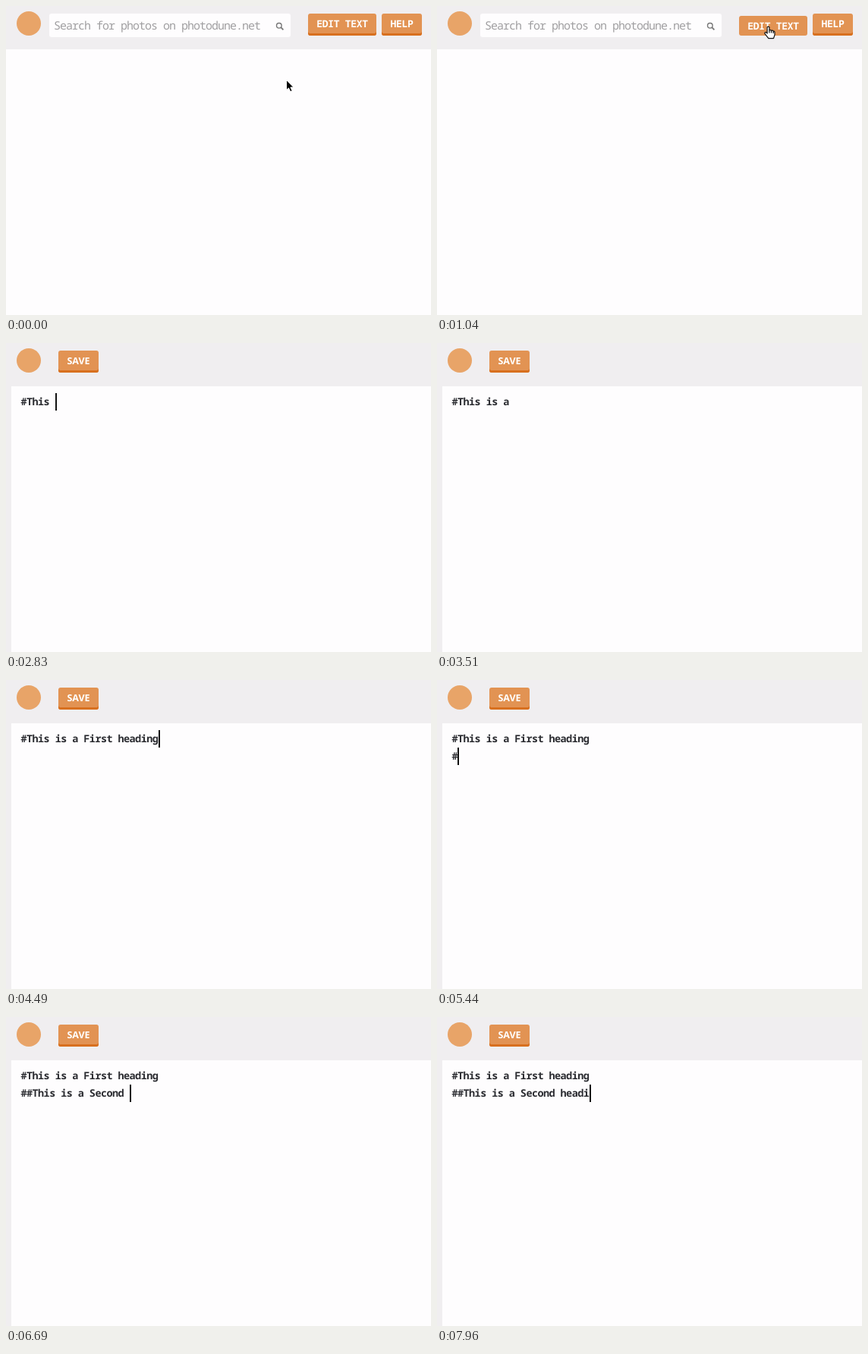
Recreate the animation shown at these times as an HTML page. Size 560x407 px, loop 8 s.

```html
<!DOCTYPE html>
<html lang="en">
<head>
<meta charset="utf-8">
<title>Markdown editor demo</title>
<style>
  html, body { margin: 0; width: 100%; height: 100%; overflow: hidden; }
  body { position: relative; background: #fefdfe; text-rendering: geometricPrecision; }
  body > *, .view > * { position: absolute; box-sizing: border-box; }
  .view { inset: 0; }
  .bar { left: 0; top: 0; width: 100%; height: 57px; background: #f0eef0; }
  .side { left: 0; top: 57px; width: 7px; bottom: 0; background: #f0eef0; }
  .logo { left: 14px; top: 7px; width: 32px; height: 32px; border-radius: 50%; background: #e8a468; }
  .mono, .btn { font-family: "Noto Sans Mono", "DejaVu Sans Mono", monospace; white-space: pre; }
  .search {
    left: 57px; top: 10px; width: 318px; height: 31px; padding-left: 6px;
    border-radius: 3px; background: #fefdfe; color: #a09fa1;
    font-size: 15px; line-height: 32px; letter-spacing: calc(8px - 1ch);
  }
  .lens { left: 355px; top: 21px; }
  .btn {
    top: 10px; height: 29px; border-radius: 3px; background: #e29353;
    box-shadow: inset 0 -3px #d8701f; color: #fff; text-align: center;
    font-size: 13px; font-weight: 700; line-height: 27px; letter-spacing: calc(7.5px - 1ch);
  }
  .btn.down { top: 13px; height: 26px; box-shadow: none; }
  .edit { left: 398px; width: 90px; }
  .help { left: 495px; width: 53px; }
  .save {
    left: 69px; width: 53px; letter-spacing: 0;
    font: 700 12.5px/27px "Open Sans", "Noto Sans", sans-serif;
  }
  .text {
    left: 19.5px; top: 66px; color: #2b2c31; font-size: 13.5px; font-weight: 600;
    line-height: 22.6px; letter-spacing: calc(7.53px - 1ch);
  }
  .caret { left: 0; top: 0; width: 2px; height: 23px; background: #111; }
  .pointer { left: 0; top: 0; overflow: visible; }
</style>
</head>
<body>
  <div class="bar"></div>
  <div class="logo"></div>

  <div class="view" id="home">
    <div class="search mono">Search for photos on photodune.net</div>
    <svg class="lens" width="12" height="12" fill="none" stroke="#777" stroke-width="1.4">
      <circle cx="4.8" cy="4.8" r="3.3"/><path d="M7.2 7.2 10.4 10.4" stroke-width="1.8"/>
    </svg>
    <div class="btn edit" id="edit">EDIT TEXT</div>
    <div class="btn help">HELP</div>
  </div>

  <div class="view" id="editor">
    <div class="side"></div>
    <div class="btn save">SAVE</div>
    <div class="text mono" id="text"></div>
    <div class="caret" id="caret"></div>
  </div>

  <svg class="pointer" id="pointer" width="1" height="1" stroke-linejoin="round">
    <path id="arrow" d="M0 0V13.2L3 10.5 5.2 15.3 7.6 14.2 5.4 9.6H9.4Z" fill="#000" stroke="#fff"/>
    <path id="hand" d="M-1.4 9V.9Q0-.7 1.4 .9V5Q3 4 4 5.4 5.8 4.6 6.6 6.2 8.3 5.8 8.5 7.6V11L7 15.6H.3L-4.6 9.4Q-4.6 7-2.8 7.6Z M1.4 5V8.4M4 5.4V8.6M6.6 6.2V9" fill="#fff" stroke="#111" stroke-width="1.2"/>
    <path id="beam" d="M-3-8H-1.2L0-7 1.2-8H3M0-7V7M-3 8H-1.2L0 7 1.2 8H3" fill="none" stroke="#333" stroke-width="1.2"/>
  </svg>

<script>
  const LOOP = 8000, PRESS = 960, OPEN = 1220, TYPE = 1940;
  const ADVANCE = 7.53, LINE = 22.6;
  const SCRIPT = "#This is a First heading\n##This is a Second headingg";

  // [time, characters typed]; a falling count is backspacing
  const KEYS = [
    [0, 0], [1939, 0], [TYPE, 1], [2110, 1], [2650, 6], [2750, 6], [3400, 10],
    [3610, 10], [4410, 24], [4640, 24], [4641, 25], [5420, 25], [5440, 26],
    [5500, 26], [6140, 36], [6200, 36], [6680, 44], [6790, 44], [7040, 49],
    [7090, 49], [7250, 52], [7420, 52], [7720, 47], [7930, 47], [7940, 48],
    [7959, 48], [7960, 49], [LOOP, 49]
  ];
  const PATH_X = [[0, 369.5], [100, 369.5], [870, 436.5], [1270, 436.5], [1670, 275.5], [LOOP, 275.5]];
  const PATH_Y = [[0, 97.5], [100, 97.5], [870, 27], [1270, 27], [1670, 85], [LOOP, 85]];
  const CARET_OFF = [[1760, TYPE], [3510, 3610]];

  const $ = id => document.getElementById(id);
  const within = (t, [from, to]) => t >= from && t < to;
  const show = (id, on) => { $(id).style.display = on ? "" : "none"; };
  const move = (id, x, y) => { $(id).style.transform = `translate(${x}px, ${y}px)`; };
  const linear = p => p;
  const smooth = p => p * p * (3 - 2 * p);

  function sample(track, t, ease) {
    const i = track.findIndex(([time]) => time > t);
    const [t0, a] = track[i - 1], [t1, b] = track[i];
    return a + (b - a) * ease((t - t0) / (t1 - t0));
  }

  function drawText(t) {
    const count = Math.floor(sample(KEYS, t, linear) + 1e-6);
    const extraLine = within(t, [4800, 5080]) ? "\n" : "";
    const typed = SCRIPT.slice(0, count) + extraLine;
    const lines = typed.split("\n");
    if ($("text").textContent !== typed) $("text").textContent = typed;
    move("caret", Math.round(19.8 + lines.at(-1).length * ADVANCE),
      Math.round(66 + (lines.length - 1) * LINE));
    show("caret", !CARET_OFF.some(span => within(t, span)));
  }

  function drawPointer(t) {
    const x = sample(PATH_X, t, smooth), y = sample(PATH_Y, t, smooth);
    const open = t >= OPEN;
    const hand = !open && x > 398 && y < 39;
    const beam = open && y > 57;
    move("pointer", x, y);
    show("pointer", t < TYPE);
    show("hand", hand);
    show("beam", beam);
    show("arrow", !hand && !beam);
  }

  const start = performance.now();
  function frame() {
    const t = (performance.now() - start) % LOOP;
    show("home", t < OPEN);
    show("editor", t >= OPEN);
    $("edit").classList.toggle("down", within(t, [PRESS, OPEN]));
    drawText(t);
    drawPointer(t);
    requestAnimationFrame(frame);
  }
  frame();
</script>
</body>
</html>
```
